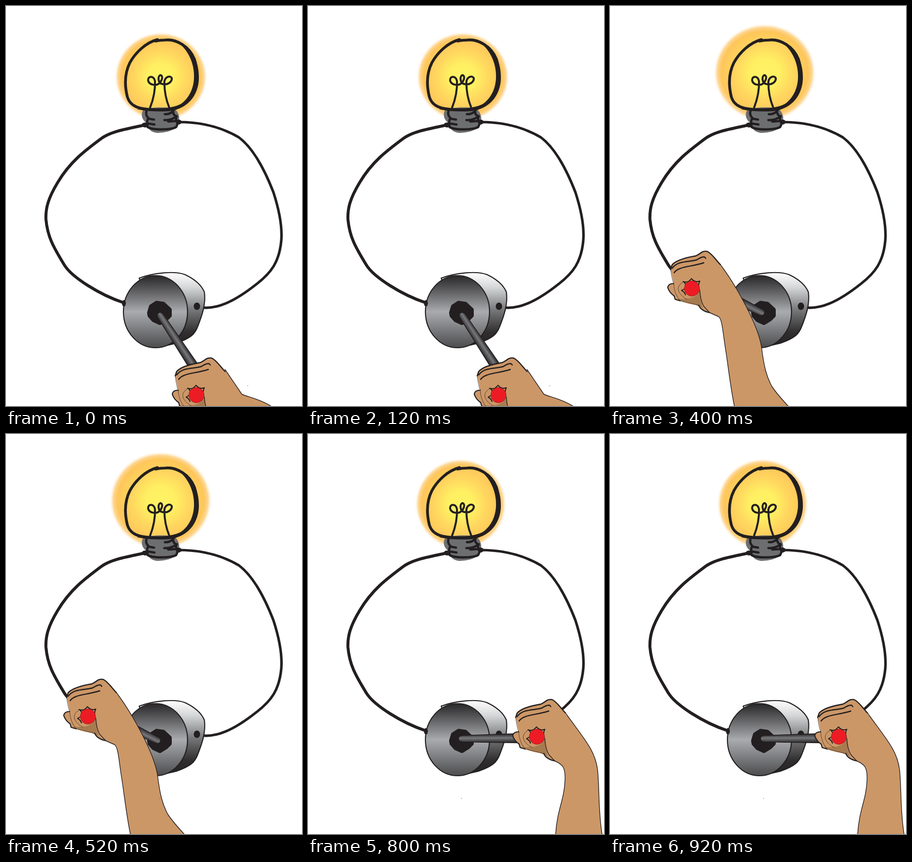
An HTML page that plays this animation: 600 px wide and 810 px high, repeating every 1000 ms.

```html
<!DOCTYPE html>
<html lang="en">
<head>
<meta charset="utf-8">
<title>Hand-cranked light bulb</title>
<style>
  html, body { margin: 0; width: 100%; height: 100%; overflow: hidden; background: #fff; }
  svg { display: block; width: 100%; height: 100%; }
  .line { fill: none; stroke: #231f20; stroke-linecap: round; stroke-linejoin: round; }
  .ink { fill: #231f20; }
  .skin { fill: #cc9767; }
</style>
</head>
<body>
<svg viewBox="0 0 600 810">
  <defs>
    <radialGradient id="light">
      <stop offset="0" stop-color="#fff265"/>
      <stop offset=".28" stop-color="#fff062"/>
      <stop offset=".56" stop-color="#ffd75f"/>
      <stop offset=".84" stop-color="#fec65a"/>
      <stop offset=".92" stop-color="#fed794"/>
      <stop offset="1" stop-color="#fff" stop-opacity="0"/>
    </radialGradient>
    <linearGradient id="face" x2="0" y2="1">
      <stop offset="0" stop-color="#2a2829"/>
      <stop offset=".1" stop-color="#414042"/>
      <stop offset=".5" stop-color="#a9abae"/>
      <stop offset="1" stop-color="#4c4c4e"/>
    </linearGradient>
    <linearGradient id="side" x2="0" y2="1">
      <stop offset="0" stop-color="#fff"/>
      <stop offset=".2" stop-color="#d5d6d7"/>
      <stop offset=".5" stop-color="#77787a"/>
      <stop offset=".8" stop-color="#302e2f"/>
      <stop offset="1" stop-color="#242122"/>
    </linearGradient>
    <linearGradient id="steel" x2="0" y2="1">
      <stop offset="0" stop-color="#231f20"/>
      <stop offset=".45" stop-color="#77787b"/>
      <stop offset="1" stop-color="#231f20"/>
    </linearGradient>
  </defs>

  <!-- bulb -->
  <ellipse id="glow" fill="url(#light)"/>
  <path fill="#6d6e70" d="M278 211C290 204 330 204 342 208C352 218 354 230 347 240C345 250 330 256 308 257C292 256 288 248 284 236C275 230 273 218 278 211Z"/>
  <g class="line" stroke-width="5.6">
    <path d="M307 68C283 74 262 95 251 115C241 135 240 160 246 184C252 204 270 209 300 210C330 211 358 207 373 187C388 165 389 130 382 108C372 82 345 66 322 69Q312 69 303 71"/>
    <path stroke-width="4.6" d="M285 212Q282 221 289 227Q284 233 287 245C297 252 335 251 345 245L349 236Q342 231 346 224Q337 220 339 211M288 228L300 230M288 238L301 240M322 219Q333 220 340 211M321 231Q335 232 346 223M329 234L343 233"/>
    <path stroke-width="4" d="M292 206Q303 178 302 152C300 141 288 141 288 150C289 160 304 162 310 157C317 151 319 141 313 140C307 142 308 157 317 158C328 161 337 153 336 146C333 140 322 143 321 154Q321 182 331 206"/>
  </g>
  <path class="ink" d="M345 71C376 81 392 112 391 147C390 181 368 209 330 213Q295 215 265 209L280 206Q300 208 330 208C360 204 379 178 381 148C383 118 370 88 345 71Z"/>

  <!-- wires -->
  <path class="line" stroke-width="6" d="M281 241C245 249 216 253 195 267C160 293 130 315 105 357C85 390 80 410 81 432C84 467 96 488 118 524C133 549 190 585 239 601"/>
  <path class="line" stroke-width="5.2" d="M350 235C400 235 438 246 472 266C504 290 526 336 542 377C555 417 560 450 558 475C554 518 538 540 508 563C465 597 425 618 388 609"/>
  <ellipse class="ink" cx="282" cy="241" rx="7" ry="5"/>
  <ellipse class="ink" cx="350" cy="235" rx="6" ry="5"/>

  <!-- generator -->
  <path class="line" stroke-width="2.2" style="fill:url(#side)" d="M270 551C300 540 342 536 363 544C382 553 396 565 402 579C406 604 396 630 389 648C383 664 376 672 345 683L310 691Z"/>
  <ellipse class="line" stroke-width="2.2" style="fill:url(#face)" cx="303" cy="619" rx="65" ry="73"/>
  <path class="ink" stroke="#231f20" stroke-width="8" stroke-linejoin="round" d="M290 621L294 608L305 601L319 603L332 615L332 627L325 634L312 642L299 636L291 627Z"/>
  <ellipse class="ink" cx="239" cy="602" rx="4" ry="6.5"/>
  <ellipse class="ink" cx="387" cy="608" rx="6.5" ry="7.5"/>

  <!-- crank and arm -->
  <path id="rod" fill="url(#steel)" stroke="#231f20" stroke-width="1.5"/>
  <path id="arm" class="skin"/>
  <path id="armEdge" class="line" stroke-width="1.4"/>
  <g id="hand">
    <path class="skin" d="M-43 -39L-40 -48C-32 -57 -16 -62 8 -66C18 -70 20 -77 31 -75C40 -71 46 -61 58 -48L90 20L36 49Q24 48 20 40L14 34Q-8 32 -24 25L-34 22L-36 15Q-46 8 -49 -2Q-48 -10 -37 -10Z"/>
    <path fill="#a77b50" d="M-31 20Q-8 24 8 15L16 4Q17 24 22 40Q4 30 -24 25Z"/>
    <g class="line">
      <path stroke-width="2.4" d="M-43 -39L-40 -48C-32 -57 -16 -62 8 -66C18 -70 20 -77 31 -75C40 -71 46 -61 58 -48M-40 -41C-28 -57 -6 -53 10 -58Q19 -64 25 -64Q27 -63 28 -61M-36 -32C-27 -45 -4 -43 24 -52"/>
      <path stroke-width="2.2" d="M-37 -10Q-48 -10 -49 -2Q-46 8 -36 15L-34 22L-24 25M14 34Q18 45 36 49"/>
      <path stroke-width=".7" d="M-43 -39Q-41 -20 -37 -10Q-36 10 -24 25L14 34M-17 -14Q-31 -5 -27 5Q-23 15 -10 22"/>
      <path stroke-width="1.4" d="M16 3Q17 24 24 36L36 49"/>
      <path stroke-width="2" d="M-18 -14Q-8 -10 -1 -20Q7 -11 16 -15Q12 -7 15 0M-16 -13Q-10 -7 -14 0L-21 4Q-15 7 -13 13"/>
    </g>
    <circle r="15.5" fill="#ed1c24" stroke="#792022" stroke-width=".7"/>
  </g>
  <circle id="speck" r=".8" fill="#666"/>
</svg>
<script>
const $ = id => document.getElementById(id);
const set = (id, attrs) => {
  for (const key in attrs) $(id).setAttribute(key, attrs[key]);
};

// glow: left, right, top; rod: hub end to grip; near/far: the two arm edges
const poses = [
  { glow: [219, 409, 52], rod: [311, 624, 382, 732], hand: [386, 788], speck: [490, 769],
    near: "444 736L478 786C490 792 510 794 537 810", far: "400 810L422 837" },
  { glow: [211, 407, 43], rod: [309, 622, 238, 693], hand: [208, 757], speck: [311, 738],
    near: "266 709C290 745 305 777 349 810", far: "242 810L242 806" },
  { glow: [209, 418, 35], rod: [310, 622, 246, 591], hand: [166, 572], speck: [311, 738],
    near: "224 524C255 565 300 645 307 690C312 730 317 750 328 770Q337 784 361 810",
    far: "252 810C244 770 241 740 235 700C229 665 228 634 220 629L202 621" },
  { glow: [211, 410, 43], rod: [311, 622, 338, 495], hand: [342, 473], speck: [311, 738],
    near: "400 425C430 463 462 510 466 545C467 610 470 660 477 695C480 720 475 735 490 757L524 810",
    far: "410 810C398 780 394 765 394 750L393 640C394 600 403 570 400 548C399 535 392 530 378 522" },
  { glow: [216, 403, 49], rod: [308, 617, 430, 616], hand: [464, 613], speck: [311, 738],
    near: "522 565C560 618 582 640 587 680C591 720 588 760 596 810",
    far: "502 810C505 760 520 740 521 700C522 675 516 669 500 662" }
];

function show({ glow: [left, right, top], rod: [x, y, gx, gy], hand, near, far, speck }) {
  const bottom = 235;
  set("glow", { cx: (left + right) / 2, cy: (top + bottom) / 2,
                rx: (right - left) / 2, ry: (bottom - top) / 2 });
  const length = Math.hypot(gx - x, gy - y);
  const angle = Math.atan2(gy - y, gx - x) * 180 / Math.PI;
  set("rod", { d: `M5 -6.5Q-3 -6 -3 0Q-3 6 5 6.5L${length} 9.5V-9.5Z`,
               transform: `translate(${x} ${y}) rotate(${angle})` });
  set("arm", { d: `M${near}L${far}Z` });
  set("armEdge", { d: `M${near}M${far}` });
  set("hand", { transform: `translate(${hand})` });
  set("speck", { cx: speck[0], cy: speck[1] });
}

const start = performance.now();
let current = -1;
function tick() {
  const step = Math.floor((performance.now() - start) / 200) % poses.length;
  if (step !== current) show(poses[current = step]);
  requestAnimationFrame(tick);
}
tick();
</script>
</body>
</html>
```
